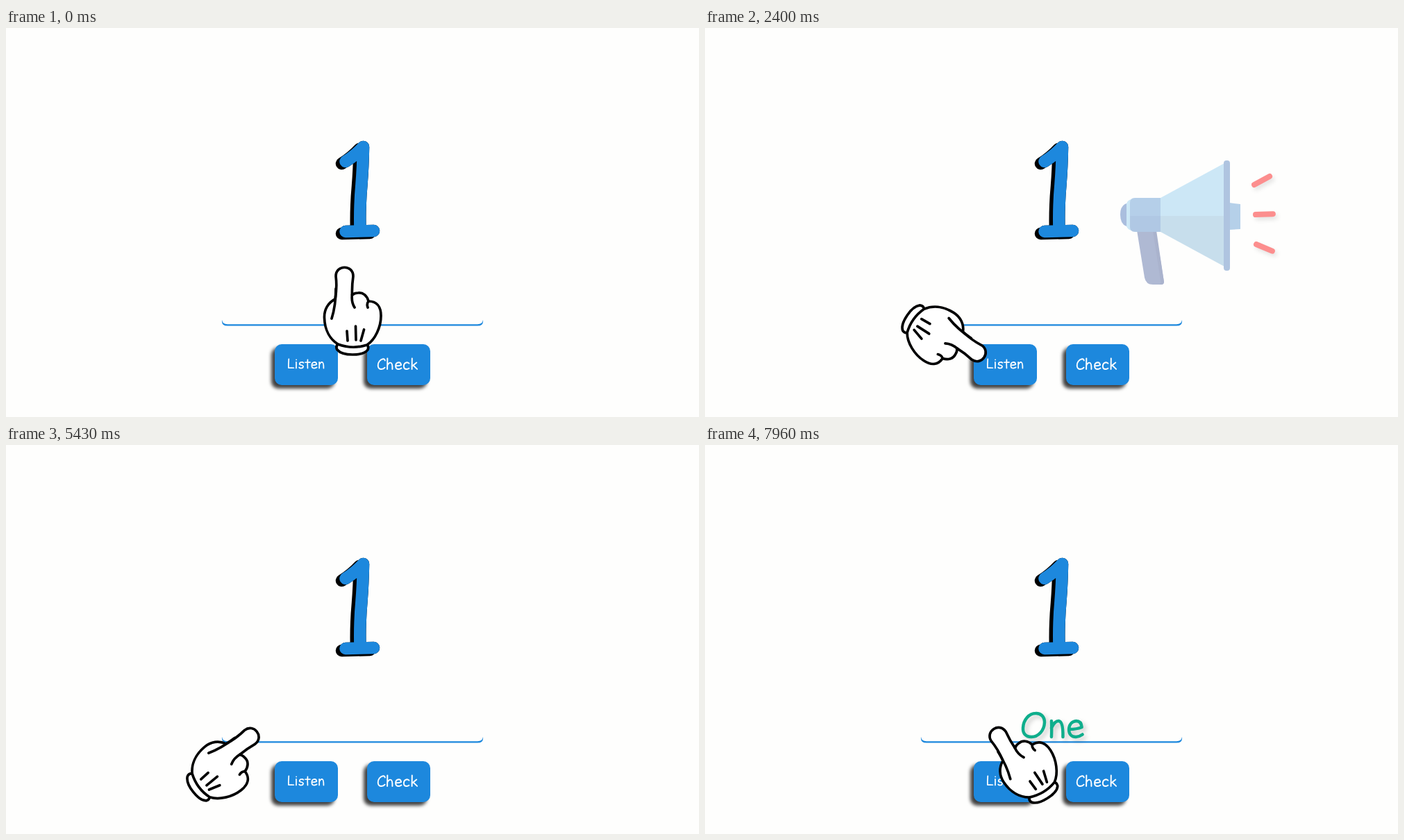
Write an HTML page that moves like this. It is 998x561 px and loops after 8 s.

```html
<!DOCTYPE html>
<html lang="en">
<head>
<meta charset="utf-8">
<title>Number spelling</title>
<style>
  html, body { margin: 0; width: 100%; height: 100%; overflow: hidden; background: #fefefd; }
  svg { display: block; width: 100%; height: 100%; }
  .pen, .ink, .rays { fill: none; stroke-linecap: round; stroke-linejoin: round; }
  .button { fill: #1d88dd; filter: drop-shadow(-5px 5px 2.5px rgba(0, 0, 0, .75)); }
  .numeral { stroke-width: 17.5; }
  .ink { stroke: #000; stroke-width: 3.7; }
  .ink.glove { fill: #fff; }
  .rays { stroke: #fb3030; stroke-width: 8; filter: drop-shadow(3px 4px 3px rgba(0, 0, 0, .2)); }
  #answer { filter: drop-shadow(4px 4px 3px rgba(0, 0, 0, .2)); }
</style>
</head>
<body>
<svg viewBox="0 0 998 561">
  <g class="pen" role="img" aria-label="1">
    <path id="one" class="numeral" stroke="#000" transform="translate(-5.5 3)"
      d="M489 192.500Q503 184 514.500 171.500Q514 200 512 225Q509 258 510 292M489 293.500Q510 293 529.500 292.500"/>
    <use href="#one" x="5.5" y="-3" style="stroke:#1d88dd"/>
    <path class="numeral" stroke="#1d88dd"
      d="M489 192.500Q503 184 514.500 171.500Q514 200 512 225Q509 258 510 292M489 293.500Q510 293 529.500 292.500"/>
  </g>

  <path fill="#1d88dd" d="M311 421Q312 427.200 319 427.200H679Q686 427.200 687 421Q688 429.600 679 429.600H319Q310 429.600 311 421Z"/>
  <rect class="button" x="387" y="456" width="91" height="59" rx="10"/>
  <rect class="button" x="520" y="456" width="91" height="59" rx="10"/>
  <g id="labels"></g>
  <g id="answer"></g>

  <g id="megaphone">
    <path fill="#6c7eb0" d="M622 292H649L661 366Q661 370 657 370H645Q635 370 633 360Z"/>
    <path fill="#6473a5" d="M645 292H650L661 366Q661 370 657 370H654Q657 369 656 364Z"/>
    <path fill="#78aad8" d="M755 252L771 254V290L755 291Z"/>
    <path fill="#6488c4" d="M612 253H607Q598 256 598 269Q598 283 607 286H612Z"/>
    <path fill="#a3d4f1" d="M607 253Q609 248 614 247V292Q609 291 607 286Z"/>
    <path fill="#78a8d9" d="M656 245H619Q612 245 612 252V271H656Z"/>
    <path fill="#6f9bcf" d="M656 294H619Q612 294 612 287V271H656Z"/>
    <path fill="#a3d4f1" d="M656 245L748 195V271H656Z"/>
    <path fill="#99c4df" d="M656 294L748 344V271H656Z"/>
    <rect fill="#6c93c9" x="747" y="191" width="9" height="159" rx="4"/>
    <path id="rays" class="rays"/>
  </g>

  <g id="hand">
    <path class="ink glove" d="M479 455Q474 459 477 464Q483 471 499 471Q516 471 521 464Q523 459 519 456Z"/>
    <path class="ink glove" d="M474 391C464 396 458 406 458.500 418C459 436 467 449 478 456Q499 464 520 457C532 449 540 431 540 415C540 402 534 394 522 394C520 386 514 381 507 382Q502 382 498.500 385Q498 372 500 358C500 341 475 341 475 358Q477 374 474 391Z"/>
    <path class="ink" d="M475 376Q475 400 469 419M498.500 384Q497 395 502 403M522 394Q519 398 521 403M491 437L492 451M503.500 430L504 450M515.500 435L511 451"/>
  </g>
</svg>
<script>
  const $ = id => document.getElementById(id);

  // Handwritten letters: [advance, pen strokes], 100 units per em, baseline at 0
  const GLYPHS = {
    C: [60.3, 'M55 -60Q52 -72 42 -71C22 -68 8 -48 8 -28C8 -10 17 -2 31 -2Q46 -3 54 -13'],
    L: [55.1, 'M13 -72Q10 -30 11 -4Q30 -5 51 -4'],
    O: [79.9, 'M44 -70C60 -71 70 -60 70 -44C69 -20 52 -2 32 -2C16 -2 7 -12 8 -28C9 -52 26 -70 44 -70Z'],
    c: [51.4, 'M43 -41Q37 -48 29 -48C16 -46 8 -35 8 -22C8 -9 15 -2 27 -2Q37 -3 43 -8'],
    e: [54.8, 'M10 -24Q30 -24 45 -30C44 -42 39 -48 29 -48C16 -47 8 -37 8 -23C8 -10 16 -2 28 -2Q39 -3 47 -9'],
    h: [57.7, 'M11 -74L10 -2M10 -26Q20 -47 31 -46Q46 -45 44 -2'],
    i: [28.1, 'M14 -48Q15 -25 14 -2M15 -67V-66'],
    k: [54, 'M12 -75L11 -2M42 -46L12 -22M21 -27L46 -3'],
    n: [52.3, 'M10 -48Q11 -25 10 -2M10 -28Q20 -49 31 -48Q44 -46 43 -2'],
    s: [48.7, 'M41 -43Q36 -49 28 -48C17 -47 11 -41 11 -34C12 -27 19 -26 26 -25Q40 -22 39 -12Q36 -2 22 -2Q12 -2 8 -8'],
    t: [47.1, 'M24 -66Q22 -30 24 -2M5 -46L43 -47']
  };

  function write(parent, text, x, y, size, color) {
    let pen = 0, letters = '';
    for (const ch of text) {
      const [advance, d] = GLYPHS[ch];
      letters += `<path transform="translate(${pen} 0)" d="${d}"/>`;
      pen += advance;
    }
    parent.innerHTML += `<g class="pen" role="img" aria-label="${text}" stroke="${color}" stroke-width="9"
      transform="translate(${x} ${y}) scale(${size / 100})">${letters}</g>`;
  }

  write($('labels'), 'Listen', 404.8, 491, 19, '#fff');
  write($('labels'), 'Check', 534, 492.5, 21.5, '#fff');
  write($('answer'), 'One', 454, 422, 50, '#0fae8c');

  const LOOP = 8000;
  const TYPED_AT = [5830, 6160, 6500];
  const RAYS = [[791, 226, 55, -30], [793, 269, 62, -2], [794, 312, 57, 24]];
  // Hand poses: [x, y, angle]; each move lasts one second
  const REST = [499, 408, 0];
  const MOVES = [
    [1000, [343.5, 449.5, 124]],
    [4800, [309.7, 465.4, 25]],
    [7500, [661.5, 444, -110]]
  ];

  const progress = (t, start) => Math.min(1, Math.max(0, (t - start) / 1000));
  const easeInOut = p => p < .5 ? 2 * p * p : 1 - 2 * (1 - p) ** 2;

  function draw(t) {
    let pose = REST;
    for (const [start, goal] of MOVES) {
      const p = easeInOut(progress(t, start));
      pose = pose.map((v, i) => v + (goal[i] - v) * p);
    }
    const [x, y, angle] = pose;
    $('hand').setAttribute('transform', `translate(${x} ${y}) rotate(${angle}) translate(-499 -408)`);

    const shown = progress(t, 2000), gone = progress(t, 3800);
    $('megaphone').style.opacity = 1 - Math.max(1 - shown, gone) ** 1.5;
    $('rays').setAttribute('d', RAYS.map(([x, y, dx, dy]) =>
      `M${x} ${y}l${dx * shown} ${dy * shown}`).join(''));

    document.querySelectorAll('#answer path').forEach((letter, i) => {
      letter.style.display = t >= TYPED_AT[i] ? '' : 'none';
    });
  }

  const begin = performance.now();
  function tick() {
    draw((performance.now() - begin) % LOOP);
    requestAnimationFrame(tick);
  }
  tick();
</script>
</body>
</html>
```
